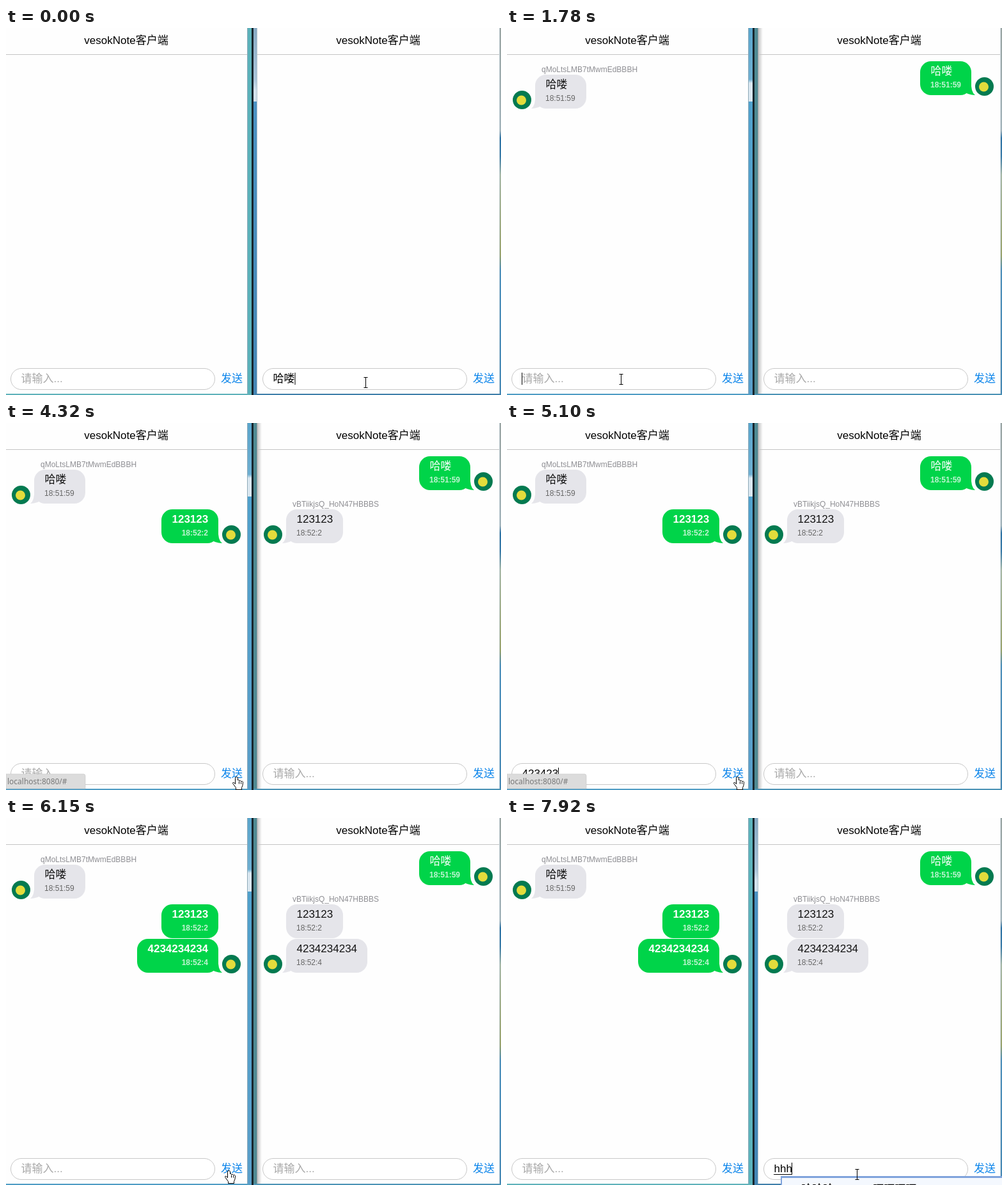
Recreate the animation shown at these times as an HTML page. Size 774x574 px, loop 8000 ms.

```html
<!DOCTYPE html>
<html lang="zh-CN">
<head>
<meta charset="utf-8">
<style>
html, body { margin: 0; width: 100%; height: 100%; overflow: hidden; background: #fefefe }
svg { display: block; font: 17px "Liberation Sans", "Noto Sans CJK SC", "Noto Sans CJK", sans-serif; white-space: pre }
.small { font-size: 12px }
.bold { font-weight: bold }
.status { font: 12px "Noto Sans", sans-serif }
</style>
</head>
<body>
<svg id="stage" width="774" height="574" viewBox="0 0 774 574">
  <defs>
    <linearGradient id="sky" x2="0" y2="1">
      <stop stop-color="#86a9c3"/><stop offset=".14" stop-color="#a9c4d9"/>
      <stop offset=".17" stop-color="#d3e1ec"/><stop offset=".2" stop-color="#d3e1ec"/>
      <stop offset=".2" stop-color="#4a92c3"/><stop offset="1" stop-color="#4486b5"/>
    </linearGradient>
    <linearGradient id="blue" x2="0" y2="1">
      <stop stop-color="#5aa6cd"/><stop offset=".14" stop-color="#6fb0d2"/>
      <stop offset=".15" stop-color="#dbe8f1"/><stop offset=".2" stop-color="#dbe8f1"/>
      <stop offset=".2" stop-color="#51a2cd"/><stop offset="1" stop-color="#5a9fca"/>
    </linearGradient>
    <linearGradient id="edge" x2="0" y2="1">
      <stop stop-color="#9aa5a3"/><stop offset=".28" stop-color="#a3b4bb"/>
      <stop offset=".3" stop-color="#2c72a4"/><stop offset=".35" stop-color="#3a7ba8"/>
      <stop offset=".4" stop-color="#a9b9a8"/><stop offset=".62" stop-color="#99a36d"/>
      <stop offset=".66" stop-color="#4e90bb"/><stop offset="1" stop-color="#4688b4"/>
    </linearGradient>
    <linearGradient id="shade">
      <stop stop-color="#777" stop-opacity=".5"/><stop offset="1" stop-color="#777" stop-opacity="0"/>
    </linearGradient>
  </defs>
  <g id="scene"></g>
</svg>
<script>
const LOOP = 8000, RIGHT = 394;
const SENT = [816, 4200, 6010], FOCUS_LEFT = 1770, FOCUS_RIGHT = 6955;

// Screen updates come in bursts: first time, last time, count
const BURSTS = [[250, 1240, 8], [1360, 2320, 8], [2470, 2620, 2], [2900, 3930, 8], [4080, 5100, 9],
  [5220, 6150, 8], [6300, 6960, 6], [7490, 7490, 1], [7800, 7920, 2]];
const ticks = BURSTS.flatMap(([a, b, n]) =>
  Array.from({ length: n }, (_, i) => Math.round(a + (b - a) * i / Math.max(1, n - 1))));
const snap = t => ticks.reduce((last, tick) => tick <= t ? tick : last, 0);

const POINTER = [[200, 562, 554], [674, 748, 552], [1099, 748, 552], [1634, 178, 549], [3194, 178, 549],
  [3560, 352, 553], [3783, 352, 553], [4207, 360, 553], [5353, 360, 553], [5884, 348, 551],
  [6150, 348, 551], [6828, 548, 557], [6960, 547, 557]];

function pointerAt(t) {
  const next = POINTER.findIndex(p => p[0] > t);
  if (next < 1) return POINTER.at(next).slice(1);
  const [a, b] = [POINTER[next - 1], POINTER[next]];
  const u = (t - a[0]) / (b[0] - a[0]), e = u * u * (3 - 2 * u);
  return [1, 2].map(i => Math.round(a[i] + (b[i] - a[i]) * e));
}

const text = (x, y, s, fill, attrs = '') => `<text x="${x}" y="${y}" fill="${fill}" ${attrs}>${s}</text>`;
const rect = (x, y, w, h, fill, attrs = '') =>
  `<rect x="${x}" y="${y}" width="${w}" height="${h}" fill="${fill}" ${attrs}/>`;

function pointer(t) {
  const [x, y] = pointerAt(t), local = x >= RIGHT ? x - RIGHT : x;
  const at = `transform="translate(${x + .5} ${y + .5})" stroke="#000"`;
  if (local > 7 && local < 327) return `<path ${at} fill="none" d="M-3-8h6M-3 8h6M0-8V8"/>`;
  if (local > 333 && local < 371)
    return `<path ${at} fill="#fff" d="M0 0q-2 0-2 2v9l-2-2q-2-1-2 1l5 7v3h9v-3q2-3 2-9q-1-2-3-1q-1-2-3-1q-1-2-2-1V2q0-2-2-2zM4 7v4M7 8v3"/>`;
  return `<path ${at} fill="#fff" d="M0 0v16l4-4 3 7 2-1-3-7h6z"/>`;
}

function bubble({ y, body, time, width, mine, last, name }) {
  const x = mine ? 332 - width : 44, fill = mine ? '#00d449' : '#e5e5ea';
  const bold = mine && /\d/.test(body) ? 'class="bold"' : '';
  const flip = mine ? '' : 'transform="matrix(-1 0 0 1 376 0)"';
  const face = mine ? 352.5 : 23.5;
  return (name ? text(54, y - 4, name, '#8e8e93', 'class="small"') : '')
    + (last ? `<path ${flip} fill="${fill}" d="M332 ${y + 32}Q331 ${y + 48} 338 ${y + 53}Q327 ${y + 53} 318 ${y + 46}z"/>`
      + `<circle cx="${face}" cy="${y + 39.5}" r="14.5" fill="#047a50"/>`
      + `<circle cx="${face - 1}" cy="${y + 40}" r="7.5" fill="#e3dc3c"/>` : '')
    + rect(x, y, width, 53, fill, 'rx="17"')
    + text(x + 16.5, y + 21, body, mine ? '#fff' : '#111', bold)
    + (mine ? text(316, y + 41, time, '#fff', 'class="small bold" text-anchor="end" opacity=".75"')
      : text(60, y + 41, time, '#666', 'class="small"'));
}

const caret = x => rect(x, 539, 1, 19, '#000');

function panel(mySide, t, typed, caretX) {
  const count = SENT.filter(s => t >= s).length;
  const messages = [
    { body: '哈喽', time: '18:51:59', width: 80, mine: mySide === 1, y: mySide ? 52 : 73, last: true,
      name: mySide ? '' : 'qMoLtsLMB7tMwmEdBBBH' },
    { body: '123123', time: '18:52:2', width: 89, mine: !mySide, y: 135, last: count < 3,
      name: mySide ? 'vBTiikjsQ_HoN47HBBBS' : '' },
    { body: '4234234234', time: '18:52:4', width: 127, mine: !mySide, y: 189, last: true },
  ];
  return `<g transform="translate(${mySide * RIGHT} 0)">`
    + rect(-1, 41, 378, 1, '#c4c4c4')
    + text(188, 25, 'vesokNote客户端', '#000', 'text-anchor="middle"')
    + messages.slice(0, count).map(bubble).join('')
    + rect(7.5, 532.5, 319, 33, '#fff', 'rx="16.5" stroke="#c8c8c8"')
    + text(23.5, 554, typed || '请输入...', typed ? '#000' : '#a9a9a9')
    + (caretX ? caret(caretX) : '')
    + text(336, 553.5, '发送', '#0a84ea') + '</g>';
}

function frames(rightActive) {
  const [a, b, foot] = rightActive ? ['#5cb3bb', 'url(#sky)', '#5fb2ba'] : ['url(#blue)', '#4f8a93', '#4f9cc4'];
  return rect(377, 0, 1, 574, '#8fa9b8') + rect(378, 0, 6, 574, a) + rect(384, 0, 3, 574, '#17252c')
    + rect(387, 0, 5, 574, b) + rect(392, 0, 1, 574, '#aebfc9')
    + (rightActive ? '' : rect(392, 0, 8, 574, 'url(#shade)'))
    + rect(771, 0, 1, 574, '#d3dde3') + rect(772, 0, 2, 574, 'url(#edge)')
    + rect(0, 572, 384, 2, foot) + rect(387, 572, 387, 2, rightActive ? '#3f7faa' : '#4b93b5');
}

function leftTyped(t) {
  if (t < SENT[1]) return '123123'.slice(0, [2320, 2470, 2620, 2900, 3040, 3190].filter(k => t >= k).length);
  if (t < SENT[2]) return '4234234234'.slice(0, Math.max(0, Math.floor((t - 4450) / 130) + 1));
  return '';
}

function scene(t) {
  const left = leftTyped(t);
  const right = t < SENT[0] ? '哈喽' : t >= 7920 ? 'hhh' : t >= 7800 ? 'h' : '';
  const composing = t >= 7800, end = right.length * 9.45;
  const leftCaret = left ? Math.round(23 + left.length * 9.45)
    : t >= FOCUS_LEFT && t < FOCUS_LEFT + 530 ? 23 : 0;
  const rightCaret = t < SENT[0] ? 57.5
    : composing ? Math.round(23 + end)
    : t >= FOCUS_RIGHT && t < 7490 ? 23 : 0;
  const rightActive = t < FOCUS_LEFT || t >= FOCUS_RIGHT;
  const status = t >= 3920 && t < 6140;
  return rect(0, 0, 774, 574, '#fefefe') + frames(rightActive)
    + panel(0, t, left, leftCaret) + panel(1, t, right, rightCaret)
    + (status ? `<g opacity="${t < 4080 ? .5 : 1}">`
      + '<path d="M0 549h121q3 0 3 3v20H0z" fill="#dcdcdc" stroke="#c6c6c6" stroke-width=".6"/>'
      + text(2, 565, 'localhost:8080/#', '#777', 'class="status"') + '</g>' : '')
    + (composing ? rect(417, 557, end, 1, '#000')
      + rect(428, 560, 350, 20, '#f4f8fe') + rect(428, 560, 346, 3, '#7fa3dc') + rect(428, 560, 2, 14, '#7fa3dc')
      + text(460, 586, '哈哈哈', '#111') + text(572, 586, '呵呵呵呵', '#111') : '')
    + pointer(t);
}

const root = document.getElementById('scene');
let shown = -1;
function draw() {
  const t = snap(performance.now() % LOOP);
  if (t !== shown) root.innerHTML = scene(shown = t);
  requestAnimationFrame(draw);
}
draw();
</script>
</body>
</html>
```
